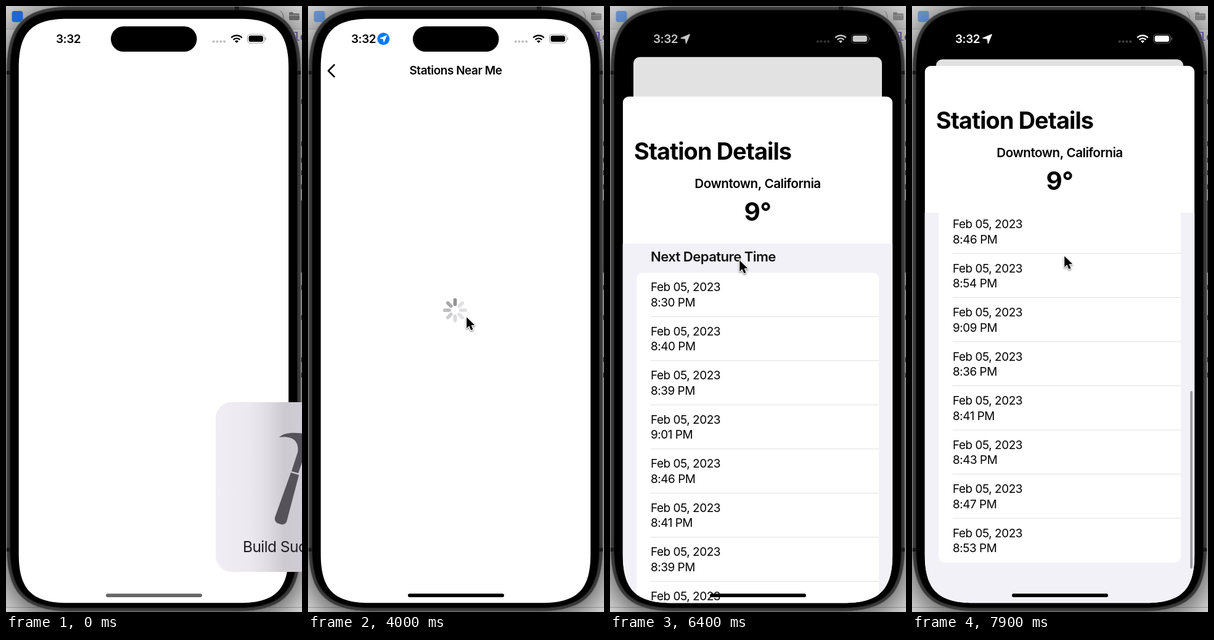
These frames come from a looping animation (480x982 px, 8 s). An HTML page with a canvas:

```html
<!DOCTYPE html>
<html lang="en">
<head>
<meta charset="utf-8">
<title>Stations Near Me</title>
<style>
html, body { margin: 0; width: 100%; height: 100%; overflow: hidden; background: #ccc; }
canvas { display: block; width: 480px; height: 982px; }
</style>
</head>
<body>
<canvas id="stage" width="480" height="982"></canvas>
<script>
const ctx = document.getElementById('stage').getContext('2d');
const LOOP = 8000, STEP = 100;
const SCREEN = { x: 20.7, y: 20.7, w: 437.5, h: 946.5 };
const BLUE = '#007aff';
const STATIONS = ['Wenvar St & Brelkdon St', 'Wenvar St & Orl St', 'Orl St & Wenvar St',
  "O'Vennell St & Brust Ave", 'Wenvar St & Orl St'];
const TIMES = ['8:30', '8:40', '8:39', '9:01', '8:46', '8:41', '8:39', '8:46',
  '8:54', '9:09', '8:36', '8:41', '8:43', '8:47', '8:53'];
const ROW = 71.5;

const POINTER = [[1700, 478, 562], [1900, 375, 545], [2100, 270, 510], [2200, 256, 503],
  [4300, 256, 503], [4800, 236, 396], [5200, 205, 325], [5500, 191, 293], [6100, 191, 293],
  [6400, 209, 411], [6900, 228, 440], [7100, 230, 440], [7300, 234, 436], [7900, 246, 404]];
const SCROLL = [[7000, 0], [7100, 36], [7200, 140], [7300, 256], [7400, 358], [7500, 436],
  [7600, 490], [7700, 525], [7800, 545], [7900, 553]];

const clamp = v => Math.max(0, Math.min(1, v));
const ramp = (t, a, b) => clamp((t - a) / (b - a));

function track(t, keys) {
  if (t <= keys[0][0]) return keys[0].slice(1);
  for (let i = 1; i < keys.length; i++) {
    const a = keys[i - 1], b = keys[i];
    if (t <= b[0]) {
      const k = ramp(t, a[0], b[0]);
      return a.slice(1).map((v, j) => v + (b[j + 1] - v) * k);
    }
  }
  return keys[keys.length - 1].slice(1);
}

// Critically damped spring, 0 to 1
function spring(ms, w) {
  const x = Math.max(0, ms) / 1000 * w;
  return 1 - (1 + x) * Math.exp(-x);
}

function layer(draw, alpha = 1) {
  if (alpha <= 0) return;
  ctx.save();
  ctx.globalAlpha *= alpha;
  draw();
  ctx.restore();
}

function rect(x, y, w, h, color) {
  ctx.fillStyle = color;
  ctx.fillRect(x, y, w, h);
}

const fillScreen = color => rect(20, 20, 439, 948, color);

function round(x, y, w, h, r, color) {
  ctx.beginPath();
  ctx.roundRect(x, y, w, h, r);
  ctx.fillStyle = color;
  ctx.fill();
}

function disc(x, y, r, color) {
  ctx.beginPath();
  ctx.arc(x, y, r, 0, Math.PI * 2);
  ctx.fillStyle = color;
  ctx.fill();
}

function poly(points, color) {
  ctx.beginPath();
  points.forEach(([x, y]) => ctx.lineTo(x, y));
  ctx.closePath();
  ctx.fillStyle = color;
  ctx.fill();
}

// Rectangle with continuous-curvature corners
function squircle(x, y, w, h, r) {
  const e = r * 1.3, c = e * 0.271, X = x + w, Y = y + h;
  ctx.beginPath();
  ctx.moveTo(x + e, y);
  ctx.lineTo(X - e, y);
  ctx.bezierCurveTo(X - c, y, X, y + c, X, y + e);
  ctx.lineTo(X, Y - e);
  ctx.bezierCurveTo(X, Y - c, X - c, Y, X - e, Y);
  ctx.lineTo(x + e, Y);
  ctx.bezierCurveTo(x + c, Y, x, Y - c, x, Y - e);
  ctx.lineTo(x, y + e);
  ctx.bezierCurveTo(x, y + c, x + c, y, x + e, y);
  ctx.closePath();
}

// y is the middle of the capital letters
function text(str, x, y, size, weight, color = '#000', align = 'left', spacing = -0.0235 * size) {
  ctx.font = `${weight} ${size}px Inter, "Noto Sans", sans-serif`;
  ctx.letterSpacing = spacing + 'px';
  ctx.textAlign = align;
  ctx.fillStyle = color;
  ctx.fillText(str, x, y + size * 0.3635);
}

function desktop(t) {
  const active = 1 - ramp(t, 0, 300);
  rect(0, 0, 480, 982, '#e6e6e6');
  rect(0, 0, 480, 37, '#d6d6d6');
  rect(0, 37, 480, 1, '#bcbcbc');
  rect(0, 974, 480, 1, '#b0b0b0');
  layer(() => {
    ctx.shadowColor = 'rgba(0,0,0,.8)';
    ctx.shadowBlur = 58;
    ctx.shadowOffsetY = 10;
    squircle(1, 1, 477, 980, 82);
    ctx.fillStyle = '#000';
    ctx.fill();
  });
  layer(() => round(9.5, 8, 18, 18, 4, '#1b68d2'), 0.55 + 0.45 * active);
  layer(() => {
    round(459, 10, 7, 5, 1.5, '#666');
    round(459, 12, 17, 11, 2, '#666');
    rect(459, 14.5, 17, 1, '#aaa');
    ctx.strokeStyle = '#555';
    ctx.beginPath();
    ctx.moveTo(445, 8);
    ctx.quadraticCurveTo(450, 12, 450, 20);
    ctx.stroke();
  }, 0.7 + 0.3 * active);
  ctx.font = '18px "Noto Sans Mono", monospace';
  ctx.letterSpacing = '0px';
  ctx.textAlign = 'left';
  ctx.fillStyle = '#4b2f9a';
  ctx.fillText('le', 466, 56);
  rect(478, 315, 2, 117, '#222');
  for (const y of [155, 223, 250, 270, 293, 456, 505, 573, 598]) rect(478.5, y - 4, 1.5, 8, '#222');
}

function body() {
  [[0.5, '#6e6e6e'], [1.6, '#3a3a3a'], [5.5, '#262626'], [7, '#000']].forEach(([d, color]) => {
    squircle(d, d, 479 - 2 * d, 982 - 2 * d, 82 - d);
    ctx.fillStyle = color;
    ctx.fill();
  });
  for (const y of [105, 878]) {
    rect(1, y, 6, 6, '#191919');
    rect(472, y, 6, 6, '#191919');
  }
  rect(371, 1, 7, 6, '#191919');
}

function home(t) {
  fillScreen('#fff');
  layer(() => {
    round(117, 466, 245, 55.5, 27.75, BLUE);
    text('Find stations near me', 239.5, 494, 19.8, 400, '#fff', 'center');
  }, t >= 3100 ? 0.6 + 0.4 * ramp(t, 3200, 3400) : ramp(t, 700, 1000));
}

function spinner(t) {
  const head = Math.floor(t / 100) % 8;
  const shades = ['#929295', '#a9a9ac', '#bcbcbe', '#cdcdcf', '#dadadc'];
  ctx.lineWidth = 5.6;
  ctx.lineCap = 'round';
  for (let i = 0; i < 8; i++) {
    const a = i * Math.PI / 4, s = Math.sin(a), c = -Math.cos(a);
    ctx.strokeStyle = shades[(head - i + 8) % 8] || '#e0e0e2';
    ctx.beginPath();
    ctx.moveTo(238.5 + s * 9.5, 493 + c * 9.5);
    ctx.lineTo(238.5 + s * 16.7, 493 + c * 16.7);
    ctx.stroke();
  }
}

function stations(t) {
  fillScreen('#fff');
  ctx.strokeStyle = '#000';
  ctx.lineWidth = 2.6;
  ctx.lineCap = ctx.lineJoin = 'round';
  ctx.beginPath();
  ctx.moveTo(42.5, 95.5);
  ctx.lineTo(33, 105);
  ctx.lineTo(42.5, 114.5);
  ctx.stroke();
  text('Stations Near Me', 239.5, 104.5, 18.9, 600, '#000', 'center');
  if (t < 4400) return layer(() => spinner(t));
  for (let i = 0; i < 6; i++) rect(44, 128.7 + i * 66.3, 414, 1, '#e0e0e2');
  if (t >= 5900) rect(20, 261.7, 439, 66.3, '#d1d0d7');
  STATIONS.forEach((name, i) => text(name, 44, 162.3 + i * 66.3, 18.9, 600));
}

function app(t) {
  const push = t < 3200 ? 0 : spring(t - 3200, 13);
  if (push < 0.995) {
    layer(() => {
      ctx.translate(-131 * push, 0);
      home(t);
    });
    fillScreen(`rgba(0,0,0,${0.1 * push})`);
  }
  if (push > 0) layer(() => {
    ctx.translate(push < 0.995 ? 437 * (1 - push) : 0, 0);
    stations(t);
  });
}

function departures(top, t) {
  const [scroll] = track(t, SCROLL);
  const y0 = top + 285.5 - scroll;
  rect(20, top + 238, 439, 900, '#f2f1f8');
  ctx.beginPath();
  ctx.rect(20, top + 238, 439, 900);
  ctx.clip();
  text('Next Depature Time', 66, y0 - 26.5, 22.1, 600, '#111', 'left', -0.56);
  round(43, y0, 393, TIMES.length * ROW, 10, '#fff');
  TIMES.forEach((time, i) => {
    const y = y0 + i * ROW;
    if (y > 982 || y < top + 100) return;
    text('Feb 05, 2023', 66, y + 23.3, 18.9, 400);
    text(time + ' PM', 66, y + 47.8, 18.9, 400);
    if (i < TIMES.length - 1) rect(66, y + ROW - 1, 370, 1, '#dfdfe2');
  });
  if (t >= 7100) round(451, 365 + scroll * 0.468, 4, 288, 2, '#9c9ca1');
}

function sheet(t, p) {
  const top = 97 + 885 * (1 - p);
  round(20.7, top, 437.5, 1000, 10, '#fff');
  text('Station Details', 39, top + 88, 37.8, 700, '#000', 'left', -0.85);
  text('Downtown, California', 239.5, top + 140.7, 20.6, 600, '#000', 'center');
  text('9°', 239.5, top + 186, 40.5, 700, '#000', 'center', -0.5);
  layer(() => departures(top, t));
}

function arrow(color, s) {
  poly([[7.2, -6.8], [1.4, 7.4], [0.4, 0.2], [-7, -0.8]].map(([x, y]) => [122 + x * s, 53 + y * s]), color);
  ctx.strokeStyle = color;
  ctx.lineWidth = 1.3 * s;
  ctx.lineJoin = 'round';
  ctx.stroke();
}

function status(t) {
  const v = Math.round(255 * ramp(t, 6150, 6470));
  const ink = `rgb(${v},${v},${v})`;
  text('3:32', 81 - 11 * ramp(t, 900, 1200), 53, 18.9, 600, ink);

  const plain = ramp(t, 4900, 5300);
  const badge = ramp(t, 1000, 1400);
  layer(() => {
    if (badge < 1) ctx.filter = `blur(${3 * (1 - badge)}px)`;
    disc(122.3, 53.2, 10, BLUE);
    if (badge > 0.6) arrow('#fff', 0.75);
  }, badge * (1 - plain));
  layer(() => arrow(ink, 1), plain);

  round(170, 33, 139.5, 41, 20.5, '#000');
  layer(() => {
    for (let i = 0; i < 4; i++) disc(336.7 + i * 5.8, 57.7, 2.1, ink);
  }, 0.24);

  const fan = [Math.PI * 1.25, Math.PI * 1.75];
  ctx.beginPath();
  ctx.moveTo(374, 60);
  ctx.arc(374, 60, 4.2, ...fan);
  ctx.fillStyle = ink;
  ctx.fill();
  ctx.strokeStyle = ink;
  ctx.lineWidth = 2.4;
  for (const r of [7.6, 12.3]) {
    ctx.beginPath();
    ctx.arc(374, 60, r, ...fan);
    ctx.stroke();
  }

  layer(() => {
    ctx.lineWidth = 1.1;
    ctx.beginPath();
    ctx.roundRect(391.5, 46, 27.5, 14, 4.6);
    ctx.stroke();
    round(420.3, 50.7, 1.6, 4.8, [0, 1.6, 1.6, 0], ink);
  }, 0.4);
  round(393.6, 48.1, 23.3, 9.8, 2.9, ink);
}

function pointer(t) {
  const [x, y] = track(t, POINTER);
  const shape = [[0, 0], [0, 18.5], [4.3, 14.6], [7.3, 21.8], [10.6, 20.4], [7.6, 13.4], [13.4, 13.2]];
  layer(() => {
    ctx.translate(x + 1.2, y + 1.2);
    ctx.scale(0.97, 0.97);
    ctx.shadowColor = 'rgba(0,0,0,.4)';
    ctx.shadowBlur = 3;
    ctx.shadowOffsetY = 1.5;
    poly(shape, '#fff');
    ctx.strokeStyle = '#fff';
    ctx.lineWidth = 2.4;
    ctx.lineJoin = 'round';
    ctx.stroke();
    ctx.shadowColor = 'transparent';
    poly(shape, '#000');
  });
}

function buildNotice() {
  const g = ctx.createLinearGradient(340, 0, 480, 0);
  [[0, '#f0edf4'], [0.4, '#ebe8ef'], [0.6, '#dfdce3'], [0.8, '#ccc9d0'], [1, '#cfccd4']]
    .forEach(stop => g.addColorStop(...stop));
  round(340, 642, 275, 275, 26, g);

  ctx.fillStyle = '#55525a';
  ctx.beginPath();
  ctx.moveTo(443, 699);
  ctx.bezierCurveTo(449, 692, 464, 690, 484, 693);
  ctx.lineTo(484, 728);
  ctx.lineTo(474, 757);
  ctx.lineTo(463, 754);
  ctx.lineTo(473, 723);
  ctx.bezierCurveTo(475, 711, 470, 703, 462, 700);
  ctx.bezierCurveTo(455, 698, 449, 698, 443, 699);
  ctx.fill();
  ctx.beginPath();
  ctx.moveTo(462, 756);
  ctx.lineTo(475, 760);
  ctx.lineTo(455, 836);
  ctx.quadraticCurveTo(452, 841, 446, 840);
  ctx.lineTo(440, 838);
  ctx.quadraticCurveTo(435, 835, 436, 829);
  ctx.closePath();
  ctx.fill();
  text('Build Succeeded', 384, 876, 24.5, 400, '#1f1d22');
}

function draw(t) {
  desktop(t);
  body();
  layer(() => {
    squircle(SCREEN.x, SCREEN.y, SCREEN.w, SCREEN.h, 61);
    ctx.clip();
    const p = t < 6200 ? 0 : spring(t - 6120, 16.43);
    fillScreen('#000');
    layer(() => {
      if (!p) return app(t);
      const k = 1 - 0.0824 * p;
      ctx.translate(239.5, 21 + 65.5 * p);
      ctx.scale(k, k);
      ctx.translate(-239.5, -21);
      ctx.beginPath();
      ctx.roundRect(21, 21, 437, 946, 11);
      ctx.clip();
      app(t);
      fillScreen(`rgba(0,0,0,${0.12 * p})`);
    });
    if (p) sheet(t, p);
    status(t);
    layer(() => round(162, 952.2, 156, 5.7, 2.85, '#000'), 0.6 + 0.4 * ramp(t, 700, 900));
  });
  if (t >= 1700) pointer(t);
  layer(buildNotice, 1 - ramp(t, 0, 300));
}

let start;
function tick(now) {
  start ??= now;
  draw(Math.floor((now - start) % LOOP / STEP) * STEP);
  requestAnimationFrame(tick);
}
draw(0);
requestAnimationFrame(tick);
</script>
</body>
</html>
```
